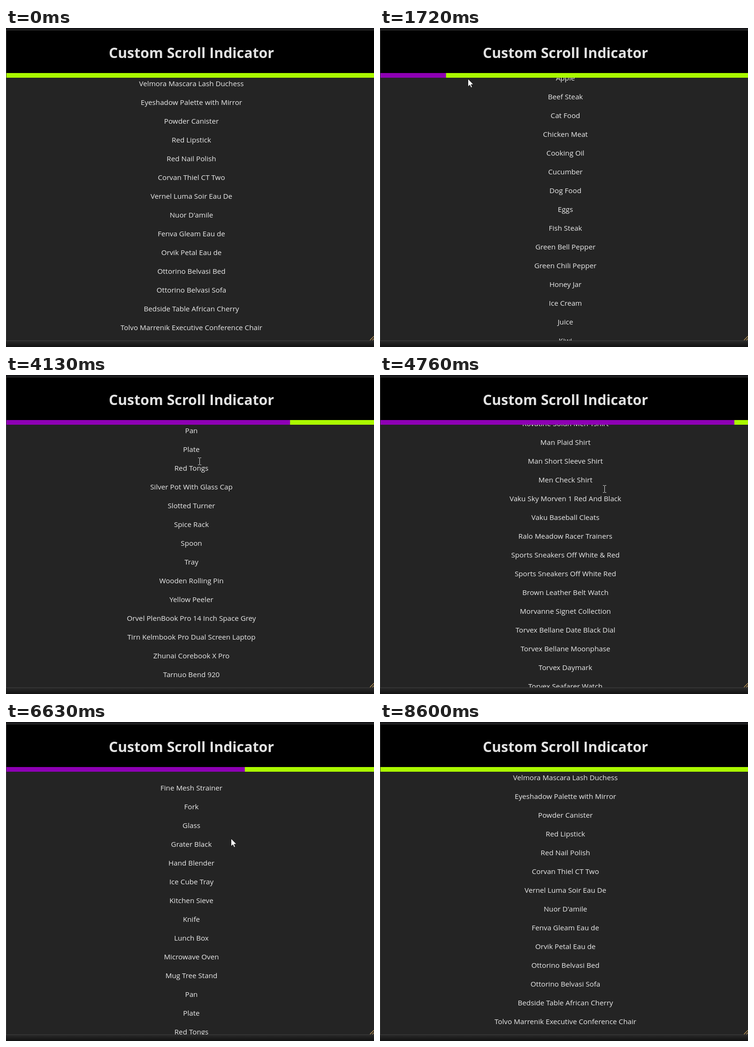
An HTML page that plays this animation: 784 by 680 pixels, repeating every 9.13 s.

```html
<!DOCTYPE html>
<html lang="en">
<head>
<meta charset="utf-8">
<title>Custom Scroll Indicator</title>
<style>
  html, body { margin: 0; width: 100%; height: 100%; overflow: hidden; background: #161616; }
  svg { display: block; width: 100vw; height: 100vh; }
  text { font-family: "Open Sans", "Noto Sans", sans-serif; text-anchor: middle; fill: #ebebeb; }
  #list text { font-size: 15.2px; }
  #title { font-size: 30.3px; font-weight: 700; fill: #e2e2e2; }
</style>
</head>
<body>
<svg viewBox="0 0 784 680">
  <defs>
    <linearGradient id="shade" x1="0" y1="0" x2="0" y2="1">
      <stop offset="0" stop-color="#292929"/>
      <stop offset="1" stop-color="#121212"/>
    </linearGradient>
    <clipPath id="view"><rect x="1" y="106" width="783" height="560"/></clipPath>
  </defs>
  <rect width="784" height="680" fill="#161618"/>
  <rect y="667" width="784" height="13" fill="url(#shade)"/>
  <rect y="4" width="784" height="663" fill="#3d3d3d"/>
  <rect x="1" y="5" width="783" height="661" fill="#242424"/>
  <g clip-path="url(#view)"><g id="list"></g></g>
  <rect x="1" y="5" width="783" height="91" fill="#000"/>
  <text id="title" x="395" y="64">Custom Scroll Indicator</text>
  <rect x="1" y="96" width="783" height="10" fill="#aaf900"/>
  <rect id="bar" x="1" y="96" width="0" height="10" fill="#8e00b4"/>
  <path d="M775.5 665.5L784 657M780.5 665.5L784 662" stroke="#d0a660" stroke-width="1.2" fill="none"/>
  <path id="arrow" d="M0 0V16.5L3.9 12.9L6.4 18.7L9 17.6L6.5 11.9H11.6Z" fill="#fff" stroke="#111" stroke-width=".9"/>
  <path id="beam" d="M-3.5 -7.5H-1L0 -6.8L1 -7.5H3.5M0 -6.8V6.8M-3.5 7.5H-1L0 6.8L1 7.5H3.5" fill="none" stroke="#dcdcdc"/>
</svg>
<script>
const LOOP = 9130, ROW = 40, MAX = 3442, BAR_WIDTH = 788, BAR_LAG = 18;
const REST = 120, SHORT = 612, LONG = 820;

const products = `Velmora Mascara Lash Duchess, Eyeshadow Palette with Mirror, Powder Canister,
Red Lipstick, Red Nail Polish, Corvan Thiel CT Two, Vernel Luma Soir Eau De, Nuor D'amile,
Fenva Gleam Eau de, Orvik Petal Eau de, Ottorino Belvasi Bed, Ottorino Belvasi Sofa,
Bedside Table African Cherry, Tolvo Marrenik Executive Conference Chair,
Wooden Bathroom Sink With Mirror, Apple, Beef Steak, Cat Food, Chicken Meat, Cooking Oil,
Cucumber, Dog Food, Eggs, Fish Steak, Green Bell Pepper, Green Chili Pepper, Honey Jar,
Ice Cream, Juice, Kiwi, Lemon, Milk, Mulberry, Dovanta Coffee, Potatoes, Protein Powder,
Red Onions, Rice, Soft Drinks, Strawberry, Tissue Paper Box, Water, Decoration Swing,
Family Tree Photo Frame, House Showpiece Plant, Plant Pot, Table Lamp, Bamboo Spatula,
Black Aluminium Cup, Black Whisk, Boxed Blender, Carbon Steel Wok, Chopping Board,
Citrus Squeezer Yellow, Egg Slicer, Electric Stove, Fine Mesh Strainer, Fork, Glass,
Grater Black, Hand Blender, Ice Cube Tray, Kitchen Sieve, Knife, Lunch Box, Microwave Oven,
Mug Tree Stand, Pan, Plate, Red Tongs, Silver Pot With Glass Cap, Slotted Turner, Spice Rack,
Spoon, Tray, Wooden Rolling Pin, Yellow Peeler, Orvel PlenBook Pro 14 Inch Space Grey,
Tirn Kelmbook Pro Dual Screen Laptop, Zhunai Corebook X Pro, Tarnuo Bend 920,
New BREN QLS 13 9300 Laptop, Blue & Black Check Shirt, Kovatine Solun Men Tshirt,
Man Plaid Shirt, Man Short Sleeve Shirt, Men Check Shirt, Vaku Sky Morven 1 Red And Black,
Vaku Baseball Cleats, Ralo Meadow Racer Trainers, Sports Sneakers Off White & Red,
Sports Sneakers Off White Red, Brown Leather Belt Watch, Morvanne Signet Collection,
Torvex Bellane Date Black Dial, Torvex Bellane Moonphase, Torvex Daymark,
Torvex Seafarer Watch, Zelvona Halo Plus, Orvel Budtones`.split(/,\s+/);

const $ = id => document.getElementById(id);
const clamp = (v, lo = 0, hi = 1) => Math.min(hi, Math.max(lo, v));
const smooth = u => u * u * (3 - 2 * u);
const mix = (a, b, u) => a + (b - a) * u;
const ease = (t, start, span) => smooth(clamp((t - start) / span));

// Equal wheel flicks with a short rest between them
const burst = (start, count, span, step) =>
  Array.from({ length: count }, (_, i) => ({ start: start + i * (span + REST), span, step }));

const flicks = [
  burst(880, 2, 850, SHORT),
  burst(3214, 2, 470, LONG),
  burst(4535, 1, 310, LONG),
  burst(5812, 1, 225, -SHORT),
  burst(6350, 3, 235, -SHORT),
  burst(7420, 2, 290, -SHORT)
].flat();

// Pointer stops: time, x, y
const stops = [
  [270, 762, 668], [680, 505, 156], [1720, 187, 108], [3310, 288, 163], [4130, 412, 184],
  [4830, 480, 245], [7310, 479, 249], [8330, 479, 256], [8540, 752, 535]
];

const list = $("list"), bar = $("bar"), arrow = $("arrow"), beam = $("beam");

products.forEach((name, i) => {
  const row = document.createElementNS("http://www.w3.org/2000/svg", "text");
  row.setAttribute("x", 395);
  row.setAttribute("y", 124 + i * ROW);
  row.textContent = name;
  list.append(row);
});

const scrollAt = t => flicks.reduce((pos, f) =>
  mix(pos, clamp(pos + f.step, 0, MAX), ease(t, f.start, f.span)), 0);

function pointerAt(t) {
  let [, x, y] = stops[0];
  for (let i = 1; i < stops.length; i++) {
    const from = stops[i - 1][0], [to, nx, ny] = stops[i];
    const u = ease(t, from, to - from);
    x = mix(x, nx, u);
    y = mix(y, ny, u);
  }
  return [Math.round(x), Math.round(y)];
}

function show(el, visible, x, y) {
  el.setAttribute("visibility", visible ? "visible" : "hidden");
  el.setAttribute("transform", `translate(${x} ${y})`);
}

function render(t) {
  list.setAttribute("transform", `translate(0 ${-Math.round(scrollAt(t))})`);
  bar.setAttribute("width", scrollAt(t - BAR_LAG) / MAX * BAR_WIDTH);

  const [x, y] = pointerAt(t);
  const inside = t >= 270 && t < 8595;
  const overText = t > 3780 && t < 6360;
  show(arrow, inside && !overText, x + .5, y + .5);
  show(beam, inside && overText, x + .5, y);
}

let begin;
function tick(now) {
  begin ??= now;
  render((now - begin) % LOOP);
  requestAnimationFrame(tick);
}
render(0);
requestAnimationFrame(tick);
</script>
</body>
</html>
```
